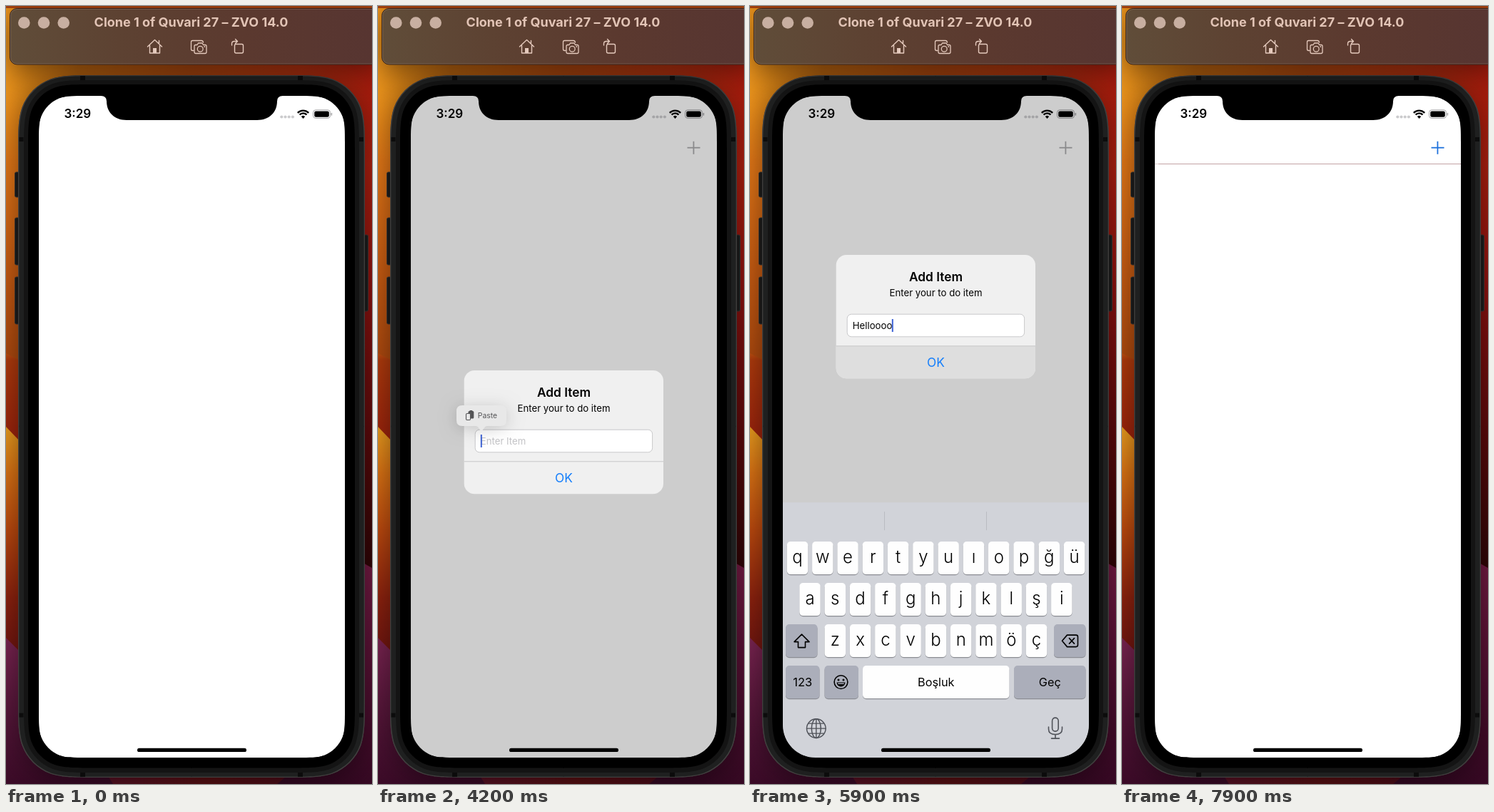
Animation of 513x1091 px, one loop 8 s. Source, as an HTML page with a canvas:

```html
<!DOCTYPE html>
<html lang="en">
<head>
<meta charset="utf-8">
<title>To do demo</title>
<style>
html, body { margin: 0; width: 100%; height: 100%; overflow: hidden; background: #000; }
canvas { display: block; width: 513px; height: 1091px; }
</style>
</head>
<body>
<canvas id="stage" width="513" height="1091"></canvas>
<script>
const LOOP = 8000;
const canvas = document.getElementById('stage');
const c = canvas.getContext('2d');
const FONT = 'Inter, "Open Sans", Arial, sans-serif';
const SCREEN = { x: 46, y: 126, w: 429, h: 928 };

const clamp = v => Math.max(0, Math.min(1, v));
const ramp = (t, a, b) => clamp((t - a) / (b - a));
const smooth = p => p * p * (3 - 2 * p);
const mix = (a, b, p) => a + (b - a) * p;
const blend = (a, b, p) => `rgb(${a.map((v, i) => Math.round(mix(v, b[i], p))).join()})`;

// Critically damped spring, ms since start
function spring(ms, speed) {
  const x = Math.max(0, ms) / 1000 * speed;
  return 1 - (1 + x) * Math.exp(-x);
}

function rect(x, y, w, h, color) {
  c.fillStyle = color;
  c.fillRect(x, y, w, h);
}

function round(x, y, w, h, r, fill, stroke, lw = 1) {
  c.beginPath();
  c.roundRect(x, y, w, h, r);
  if (fill) { c.fillStyle = fill; c.fill(); }
  if (stroke) { c.strokeStyle = stroke; c.lineWidth = lw; c.stroke(); }
}

// Rectangle with continuous corners
function squircle(x, y, w, h, r) {
  const shape = new Path2D();
  const corner = new Path2D();
  const a = 1.5287 * r, b = 1.0885 * r, d = 0.8684 * r, e = 0.6315 * r,
        f = 0.0749 * r, g = 0.3728 * r, k = 0.1691 * r;
  corner.moveTo(w / 2, h / 2);
  corner.lineTo(w / 2, 0);
  corner.lineTo(a, 0);
  corner.bezierCurveTo(b, 0, d, 0, e, f);
  corner.bezierCurveTo(g, k, k, g, f, e);
  corner.bezierCurveTo(0, d, 0, b, 0, a);
  corner.lineTo(0, h / 2);
  corner.closePath();
  [[1, 1], [-1, 1], [-1, -1], [1, -1]].forEach(([sx, sy]) =>
    shape.addPath(corner, new DOMMatrix([sx, 0, 0, sy, sx > 0 ? x : x + w, sy > 0 ? y : y + h])));
  return shape;
}

function solid(x, y, w, h, r, fill) {
  c.fillStyle = fill;
  c.fill(squircle(x, y, w, h, r), 'nonzero');
  rect(x + w / 2 - 1, y, 2, h, fill);
  rect(x, y + h / 2 - 1, w, 2, fill);
}

function disc(x, y, r, fill) {
  c.beginPath();
  c.arc(x, y, r, 0, 7);
  c.fillStyle = fill;
  c.fill();
}

function poly(points, fill) {
  c.beginPath();
  points.forEach(([x, y]) => c.lineTo(x, y));
  c.fillStyle = fill;
  c.fill();
}

function path(d, color, lw, x = 0, y = 0) {
  c.save();
  c.translate(x, y);
  c.strokeStyle = color;
  c.lineWidth = lw;
  c.lineCap = c.lineJoin = 'round';
  c.stroke(new Path2D(d));
  c.restore();
}

function ring(x, y, rx, ry, color, lw) {
  c.beginPath();
  c.ellipse(x, y, rx, ry, 0, 0, 7);
  c.strokeStyle = color;
  c.lineWidth = lw;
  c.stroke();
}

function withShadow(alpha, blur, dy, drawShape) {
  c.save();
  c.shadowColor = `rgba(0,0,0,${alpha})`;
  c.shadowBlur = blur;
  c.shadowOffsetY = dy;
  drawShape();
  c.restore();
}

function text(str, x, y, size, weight, color, align = 'center') {
  c.font = `${weight} ${size}px ${FONT}`;
  c.textAlign = align;
  c.fillStyle = color;
  c.fillText(str, x, y);
}

function gradient(x0, y0, x1, y1, ...stops) {
  const g = c.createLinearGradient(x0, y0, x1, y1);
  stops.forEach(([p, color]) => g.addColorStop(p, color));
  return g;
}

function wallpaper() {
  rect(0, 0, 513, 1091, gradient(0, 0, 513, 0,
    [0, '#ea931c'], [0.06, '#d98416'], [0.2, '#b8630f'], [0.5, '#a8450d'], [0.8, '#b0300f'], [1, '#a71b0c']));
  rect(0, 0, 513, 3, '#a8430f');
  rect(0, 120, 256, 480, gradient(0, 120, 0, 600,
    [0, 'rgba(238,132,22,0)'], [0.2, '#e67917'], [0.5, '#cc5e12'], [0.77, '#b04a0e'], [1, '#a83d0d']));
  poly([[0, 487], [40, 507], [40, 640], [0, 640]],
    gradient(0, 487, 0, 610, [0, '#c2500f'], [0.08, '#b23b0c'], [1, '#9c210c']));
  poly([[0, 590], [40, 632], [40, 940], [0, 940]],
    gradient(0, 590, 0, 910, [0, '#eda01f'], [0.2, '#dd7414'], [0.45, '#bf4a0e'], [0.75, '#8f220e'], [1, '#6e140f']));
  rect(256, 120, 257, 700, gradient(0, 120, 0, 800,
    [0, 'rgba(176,30,14,0)'], [0.15, '#ad1f0f'], [0.4, '#8e120f'], [0.7, '#5d0a0b'], [1, '#2c0405']));
  rect(60, 1000, 440, 91, gradient(60, 0, 500, 0, [0, '#5a1230'], [0.5, '#5c1013'], [1, '#44091f']));
  poly([[0, 886], [60, 946], [150, 1091], [0, 1091]],
    gradient(0, 886, 0, 1091, [0, '#7d2553'], [0.4, '#5f193f'], [1, '#3b0a27']));
  poly([[490, 775], [513, 788], [513, 1091], [380, 1091], [490, 1000]],
    gradient(0, 780, 0, 1091, [0, '#741a43'], [0.4, '#5b1236'], [1, '#360823']));
}

function titleBar() {
  const ink = '#e5cabd';
  withShadow(0.45, 40, 10, () => round(5.5, 3.5, 520, 78.5, 10, '#5d4232'));
  round(5.5, 3.5, 520, 78.5, 10,
    gradient(5, 0, 513, 0, [0, '#604d39'], [0.3, '#5d4232'], [0.65, '#5b392f'], [1, '#573531']), '#36221a');
  round(6.5, 4.5, 520, 76.5, 9, null, 'rgba(255,225,205,.16)');
  [25.3, 53, 80.7].forEach(x => disc(x, 23.5, 8.3, '#c8afa1'));
  text('Clone 1 of Quvari 27 – ZVO 14.0', 259.5, 29, 18, 700, '#e2c4b6');
  // Home
  path('M198.500 57 L208.500 47.500 L218.500 57 M201.500 55 V66 H215.500 V55 M214.500 52 V48.500', ink, 1.4);
  rect(206, 59, 5, 7, ink);
  // Screenshots
  path('M263 62.500 H261.500 Q259.500 62.500 259.500 60.500 V50.500 Q259.500 48.500 261.500 48.500 H274 Q276 48.500 276.500 51', ink, 1.3);
  path('M266 54.500 H268 L269.500 52 H275 L276.500 54.500 H279 Q281 54.500 281 56.500 V64.500 Q281 66.500 279 66.500 H266 Q264 66.500 264 64.500 V56.500 Q264 54.500 266 54.500 Z', ink, 1.3);
  ring(272.2, 60.2, 3.9, 3.9, ink, 1.3);
  disc(278.3, 57, 0.9, ink);
  // Rotate
  round(320.5, 53.5, 12, 12.5, 2, null, ink, 1.4);
  path('M316.500 55 V53 Q316.500 49.500 320 49.500 H324 M321.500 46.500 L324.500 49.500 L321.500 52.500', ink, 1.4);
}

function phoneBody() {
  [[12.5, 233, 35], [12.5, 297, 66], [12.5, 380, 66], [499.5, 321, 107]].forEach(([x, y, h]) =>
    round(x, y, 8, h, 2, '#1d1d1d', '#3b3936'));
  withShadow(0.45, 45, 10, () => {
    c.fillStyle = '#403f3e';
    c.fill(squircle(17, 97, 486, 985, 72));
  });
  solid(17, 97, 486, 985, 72, '#403f3e');
  solid(18.3, 98.3, 483.4, 982.4, 71, '#1f2020');
  solid(25, 104, 470, 971, 65, '#141414');
  [104, 409].forEach(x => [98, 1075].forEach(y => rect(x, y, 7, 6, '#0c0c0c')));
  [18.5, 495].forEach(x => [184, 991.5].forEach(y => rect(x, y, 6, 6, '#0c0c0c')));
  solid(31, 110, 458, 958.5, 59, '#000');
}

function notch() {
  c.fillStyle = '#000';
  c.fill(new Path2D('M133 125 V126 Q141 126 141 133.500 C141 149 152 160 169 160 H352 C369 160 380 149 380 133.500 Q380 126 388 126 V125 Z'));
}

function statusBar(dim) {
  text('3:29', 81.5, 157, 17, 600, '#000', 'left');
  const dot = blend([203, 203, 205], [164, 164, 166], dim);
  for (let i = 0; i < 4; i++) disc(386.3 + i * 5.2, 155.5, 2.1, dot);
  c.strokeStyle = '#000';
  c.lineCap = 'butt';
  c.lineWidth = 2.4;
  [10.7, 6.9].forEach(r => {
    c.beginPath();
    c.arc(416.5, 157.3, r, -Math.PI * 0.755, -Math.PI * 0.245);
    c.stroke();
  });
  c.beginPath();
  c.moveTo(416.5, 158);
  c.arc(416.5, 157.6, 3.7, -Math.PI * 0.755, -Math.PI * 0.245);
  c.fillStyle = '#000';
  c.fill();
  const rim = blend([165, 165, 167], [130, 130, 132], dim);
  round(430.5, 145.8, 24, 11.6, 3.6, null, rim);
  round(432.2, 147.5, 20.6, 8.2, 2.2, '#000');
  round(455.6, 149.8, 1.5, 4, 1, rim);
}

function plusButton(t, dim) {
  const shown = ramp(t, 800, 900);
  if (!shown) return;
  c.save();
  c.globalAlpha = shown;
  const color = blend([31, 114, 220], [138, 138, 140], dim);
  rect(433.5, 197.8, 18, 1.8, color);
  rect(441.5, 189.8, 1.8, 18, color);
  c.restore();
}

function tableRow(t) {
  if (t < 6150) return;
  const top = 221, full = 45.6;
  const open = smooth(ramp(t, 6750, 7500));
  const gone = ramp(t, 7750, 7895);
  const h = Math.max(1, mix(full, 1, smooth(gone)));
  const shift = mix(77 * open, SCREEN.w, smooth(gone));
  c.save();
  c.beginPath();
  c.rect(SCREEN.x, top, SCREEN.w, h);
  c.clip();
  if (gone === 1) {
    rect(46, top, 5, 1, '#e3d3d3');
    rect(51, top, 424, 1, '#c3a3a5');
  } else {
    text('Helloooo', 66.7 - shift, top + 29, 17.3, 400, '#000', 'left');
    rect(66.7 - shift, top + h - 1, 409, 1, '#c6c6c8');
    rect(475 - shift, top, shift, h, '#ff3b30');
    if (shift > 4) text('Delete', 475 - shift + Math.max(shift, 77) / 2, top + 29, 15.5, 400, '#fff');
  }
  c.restore();
}

// Caret fades: times when it goes off and comes back
function caretAlpha(t) {
  let a = 1;
  [[3150, 3350, 3600, 3850], [4220, 4400, 4560, 4700], [5380, 5500, 5600, 5700]].forEach(([a0, a1, b0, b1]) => {
    if (t >= a0 && t <= b1) a = 1 - ramp(t, a0, a1) + ramp(t, b0, b1);
  });
  return a;
}

function dialog(t, lift, alpha, scale) {
  const top = 511 - 162 * lift, mid = 260.5;
  const pasted = t >= 4850;
  c.save();
  c.globalAlpha = alpha;
  c.translate(mid, top + 86.5);
  c.scale(scale, scale);
  c.translate(-mid, -86.5);
  round(120.7, 0, 279.3, 173.3, 14.5, '#f0f0f0');
  if (t >= 5750) round(120.7, 128, 279.3, 45.3, [0, 0, 14.5, 14.5], '#dedede');
  text('Add Item', mid, 37, 17.3, 600, '#000');
  text('Enter your to do item', mid, 58, 13.2, 400, '#000');
  round(136.2, 83.2, 248.4, 31.6, 6, '#fff', '#c9c9cb');
  if (pasted) text('Helloooo', 143.8, 104, 13.2, 400, '#000', 'left');
  else text('Enter Item', 143.8, 104, 13.2, 400, '#c4c4c7', 'left');
  c.globalAlpha = alpha * caretAlpha(t);
  rect(pasted ? 198.8 : 143.8, 90, 2, 18, '#3d63d6');
  c.globalAlpha = alpha;
  rect(120.7, 127.3, 279.3, 1, '#c6c6c8');
  text('OK', mid, 157, 17.3, 400, '#147efb');
  c.restore();
}

function pasteMenu(t) {
  const a = ramp(t, 4050, 4190) * (1 - ramp(t, 4800, 4880));
  if (!a) return;
  c.save();
  c.globalAlpha = a;
  withShadow(0.18, 22, 3, () => {
    c.fillStyle = '#e8e8e8';
    c.fill(new Path2D('M118 560 H172 Q180 560 180 568 V581 Q180 589 172 589 H153 C149 589 147 596 145 596 C143 596 141 589 137 589 H118 Q110 589 110 581 V568 Q110 560 118 560 Z'));
  });
  round(126.5, 568, 7.8, 10.5, 1.5, '#545456');
  rect(128.6, 567, 3.6, 2, '#545456');
  round(123.5, 571.5, 6, 9, 1.2, '#e8e8e8', '#545456', 1.1);
  text('Paste', 139.8, 578, 10.4, 400, '#545456', 'left');
  c.restore();
}

function key(x, y, w, label, size = 24, gray = false) {
  round(x, y + 1.2, w, 46, 5, '#8b8d93');
  round(x, y, w, 46, 5, gray ? '#abaeba' : '#fefefe');
  if (label) text(label, x + w / 2, y + (size > 20 ? 30 : 28.5), size, size > 20 ? 300 : 400, '#000');
}

function keyRow(letters, first, y) {
  [...letters].forEach((ch, i) => key(first + i * 35.28 - 14.7, y, 29.4, ch));
}

function keyboard(top, bar) {
  rect(SCREEN.x, top, SCREEN.w, 1060 - top, '#d1d3d9');
  if (bar > 40) [188, 331].forEach(x => rect(x, top + 13, 1, 26, '#b9bbc1'));
  const y = top + bar;
  keyRow('qwertyuıopğü', 66.5, y);
  keyRow('asdfghjklşi', 84, y + 58);
  keyRow('zxcvbnmöç', 119.3, y + 116);
  key(50, y + 116, 44.5, '', 0, true);
  key(426, y + 116, 44.5, '', 0, true);
  key(50, y + 174, 47.5, '123', 16.5, true);
  key(104.5, y + 174, 47.5, '', 0, true);
  key(158, y + 174, 205.5, 'Boşluk', 16.3);
  key(370, y + 174, 100.5, 'Geç', 16.3, true);
  path('M72.500 130 L83 140.500 H77.500 V148.500 H67.500 V140.500 H62 Z', '#000', 1.6, 0, y);
  path('M444.500 131 H457 Q459.500 131 459.500 133.500 V145 Q459.500 147.500 457 147.500 H444.500 L437.500 139.200 Z M447.500 135.500 L454.500 143 M454.500 135.500 L447.500 143', '#000', 1.6, 0, y);
  // Smiley
  const sy = y + 197;
  ring(127.5, sy, 9.4, 9.4, '#000', 1.6);
  disc(124, sy - 3, 1.5, '#000');
  disc(131, sy - 3, 1.5, '#000');
  c.beginPath();
  c.arc(127.5, sy + 0.5, 6, 0, Math.PI);
  c.closePath();
  c.fill();
  rect(123.2, sy + 1.4, 8.6, 1.5, '#abaeba');
  // Globe and microphone
  const gy = y + 262, ink = '#50535a';
  [13.3, 6.5].forEach(rx => ring(92.8, gy, rx, 13.3, ink, 1.5));
  path('M79.500 0 H106 M92.800 -13 V13 M82 -7 H103.500 M82 7 H103.500', ink, 1.4, 0, gy);
  round(423.6, gy - 15, 8.6, 19, 4.3, null, ink, 1.6);
  path('M418.500 -2 V1 Q418.500 8.500 428 8.500 Q437.500 8.500 437.500 1 V-2 M428 8.500 V14 M422.500 14 H433.500', ink, 1.6, 0, gy);
}

function screen(t) {
  const show = ramp(t, 2560, 2960);
  const leave = spring(t - 5900, 27);
  const fade = Math.pow(1 - leave, 1.15);
  const dim = smooth(show) * fade;
  const lift = spring(t - 4800, 20);
  c.save();
  c.beginPath();
  c.roundRect(SCREEN.x, SCREEN.y, SCREEN.w, SCREEN.h, 46);
  c.clip();
  solid(SCREEN.x, SCREEN.y, SCREEN.w, SCREEN.h, 44, blend([255, 255, 255], [205, 205, 205], dim));
  statusBar(dim);
  plusButton(t, dim);
  tableRow(t);
  if (show && fade > 0.002) {
    dialog(t, lift, smooth(show) * fade, mix(1.17, 1, 1 - Math.pow(1 - show, 3)));
    pasteMenu(t);
  }
  const raised = lift * (1 - leave);
  if (raised > 0.002) keyboard(1054 - 358 * raised, 55 - 48.5 * leave);
  round(184, 1040.8, 153, 5.2, 2.6, '#000');
  c.restore();
  notch();
}

function draw(t) {
  wallpaper();
  phoneBody();
  titleBar();
  screen(t);
}

const start = performance.now();
function tick() {
  draw((performance.now() - start) % LOOP);
  requestAnimationFrame(tick);
}
tick();
</script>
</body>
</html>
```
